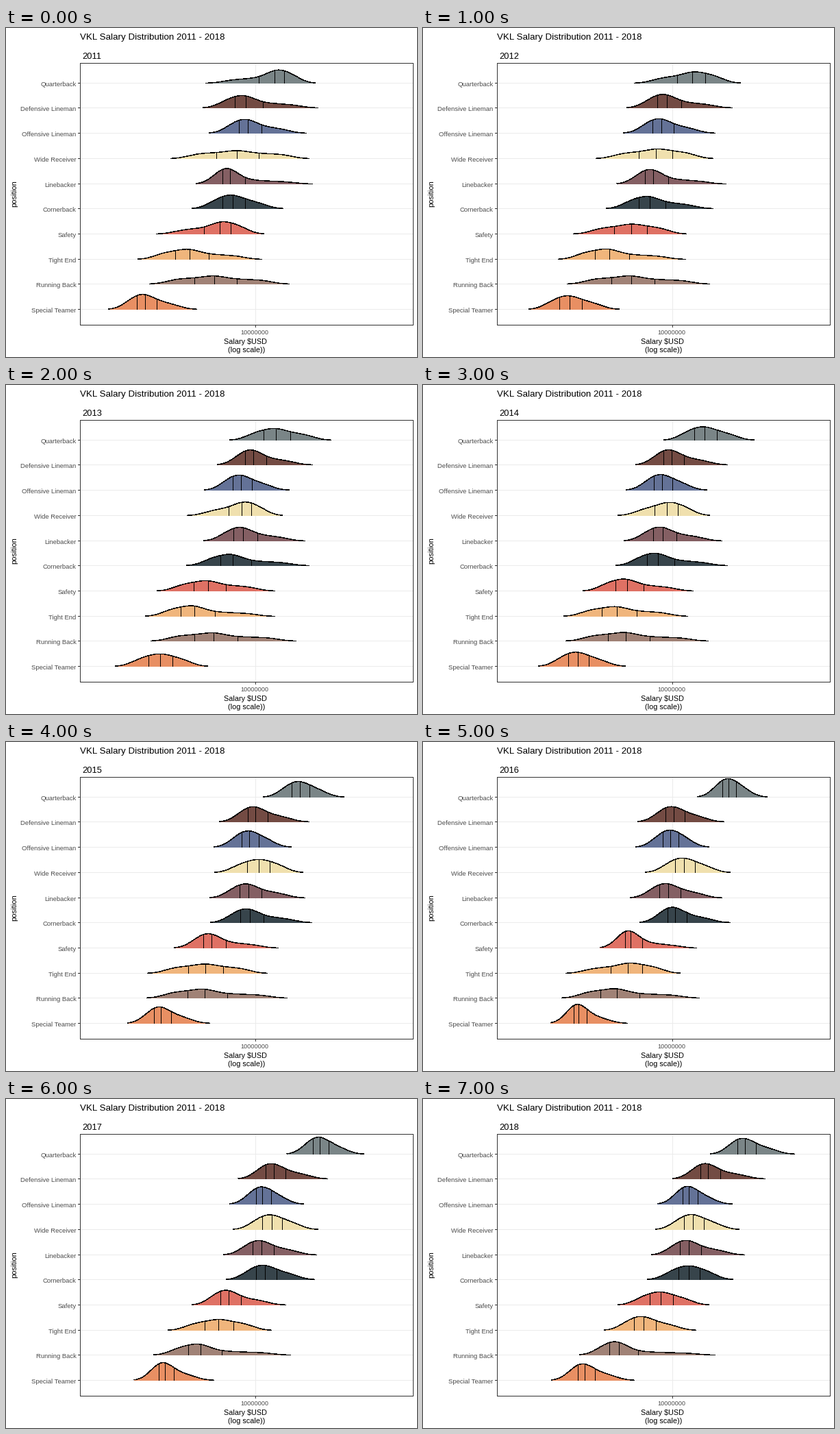
A matplotlib script that plays this animation: 600x480 px, repeating every 8000 ms.

```python
import numpy as np
import matplotlib.pyplot as plt
from matplotlib.animation import FuncAnimation
from matplotlib.patches import Polygon

W, H, DPI = 600, 480, 100
PX = 72 / DPI
LEFT, RIGHT, TOP, BOTTOM = 108, 594, 51, 433
BANDWIDTH, MARGIN, AREA = 13, 25, 1300
THIN = 0.4 * PX

# Start, median and end of each ridge in the key seasons.
KEY_SEASONS = [2011, 2013, 2016, 2018]
POSITIONS = [
    ("Quarterback", "#7a8587",
     [(291, 392, 451), (326, 394, 474), (400, 446, 502), (419, 470, 542)]),
    ("Defensive Lineman", "#734b43",
     [(287, 350, 455), (308, 361, 447), (313, 366, 439), (364, 416, 499)]),
    ("Offensive Lineman", "#647297",
     [(296, 353, 438), (289, 343, 413), (310, 361, 417), (342, 388, 451)]),
    ("Wide Receiver", "#f0e0ae",
     [(240, 337, 442), (264, 344, 403), (324, 381, 448), (339, 394, 461)]),
    ("Linebacker", "#845f63",
     [(277, 327, 447), (288, 346, 436), (302, 358, 436), (333, 388, 469)]),
    ("Cornerback", "#37444b",
     [(271, 331, 404), (263, 331, 442), (316, 368, 448), (327, 388, 452)]),
    ("Safety", "#df7164",
     [(219, 312, 376), (220, 295, 392), (258, 303, 399), (284, 347, 417)]),
    ("Tight End", "#f0b57c",
     [(192, 268, 373), (203, 275, 392), (208, 299, 375), (264, 322, 398)]),
    ("Running Back", "#a08276",
     [(209, 304, 413), (211, 303, 423), (202, 283, 403), (228, 286, 426)]),
    ("Special Teamer", "#e88f63",
     [(149, 203, 278), (159, 225, 294), (186, 227, 298), (187, 236, 308)]),
]


def extent(keys, season):
    return [np.interp(season, KEY_SEASONS, values) for values in zip(*keys)]


def spread(start, median, end):
    """Function giving the salaries a fraction u of the way out on each side."""
    left, right = median - start - MARGIN, end - MARGIN - median
    skew = (right / left) ** 0.4
    a, b = 1.25 * max(1, 1 / skew), 1.25 * max(1, skew)
    return lambda u: (median - left * u ** a, median + right * u ** b)


def density(x, data):
    z = (np.asarray(x)[:, None] - data) / BANDWIDTH
    return AREA * np.exp(-z * z / 2).mean(axis=1) / (BANDWIDTH * np.sqrt(2 * np.pi))


plt.rcParams["font.family"] = "Liberation Sans"
fig = plt.figure(figsize=(W / DPI, H / DPI), dpi=DPI, facecolor="white")
ax = fig.add_axes([0, 0, 1, 1])
ax.set_xlim(0, W)
ax.set_ylim(H, 0)
ax.axis("off")


def line(xs, ys, color, z=1):
    """Hard one-pixel line through pixel centres."""
    return ax.plot(np.add(xs, 0.5), np.add(ys, 0.5), color=color, lw=THIN,
                   antialiased=False, snap=False, solid_capstyle="butt", zorder=z)[0]


def text(x, y, s, size, color="black", **kw):
    return ax.text(x, y, s, fontsize=size * PX, color=color,
                   **{"va": "baseline", **kw})


line([364, 364], [TOP, BOTTOM], "#ebebeb")
line([364, 364], [BOTTOM, BOTTOM + 3], "#333333")
line([LEFT, RIGHT, RIGHT, LEFT, LEFT], [TOP, TOP, BOTTOM, BOTTOM, TOP], "#333333", 4)

ridges = []
for i, (name, color, keys) in enumerate(POSITIONS):
    y = round(79.6 + 36.73 * i)
    line([LEFT, RIGHT], [y, y], "#ebebeb")
    line([LEFT - 3, LEFT], [y, y], "#333333")
    text(102.4, y + 4.8, name, 9.5, "#4d4d4d", ha="right")
    fill = Polygon([(0, 0), (0, 0), (0, 0)], fc=color, ec="none",
                   antialiased=False, zorder=2)
    ax.add_patch(fill)
    edge = line([], [], "black", 3)
    marks = [line([], [], "black", 3) for _ in range(3)]
    ridges.append((keys, y, fill, edge, marks))

text(108, 17, "VKL Salary Distribution 2011 - 2018", 13.4)
text(363.2, 447, "10000000", 9.2, "#4d4d4d", ha="center")
text(349.3, 461, r"Salary \$USD", 10.8, ha="center")
text(351, 473, "(log scale))", 10.9, ha="center")
text(17, 242, "position", 11.2, rotation=90, ha="right", va="center")
year = text(111.4, 45, "2011", 12.9)

STEPS = (np.arange(120) + 0.5) / 120


def draw(i):
    season = 2011 + i
    year.set_text(str(season))
    for keys, y, fill, edge, marks in ridges:
        start, median, end = extent(keys, season)
        salaries = spread(start, median, end)
        data = np.concatenate(salaries(STEPS))

        x = np.linspace(start, end, 240)
        top = y - density(x, data)
        fill.set_xy(np.column_stack([np.r_[x, end, start], np.r_[top, y, y]]) + 0.5)
        edge.set_data(x + 0.5, top + 0.5)

        low, high = salaries(0.5)
        quartiles = np.round([low, median, high])
        for mark, q, h in zip(marks, quartiles, density(quartiles, data)):
            mark.set_data([q + 0.5] * 2, [y + 0.5, y - h + 0.5])
    return [year]


anim = FuncAnimation(fig, draw, frames=8, interval=1000, repeat=True,
                     repeat_delay=0, init_func=lambda: draw(0))
plt.show()
```
